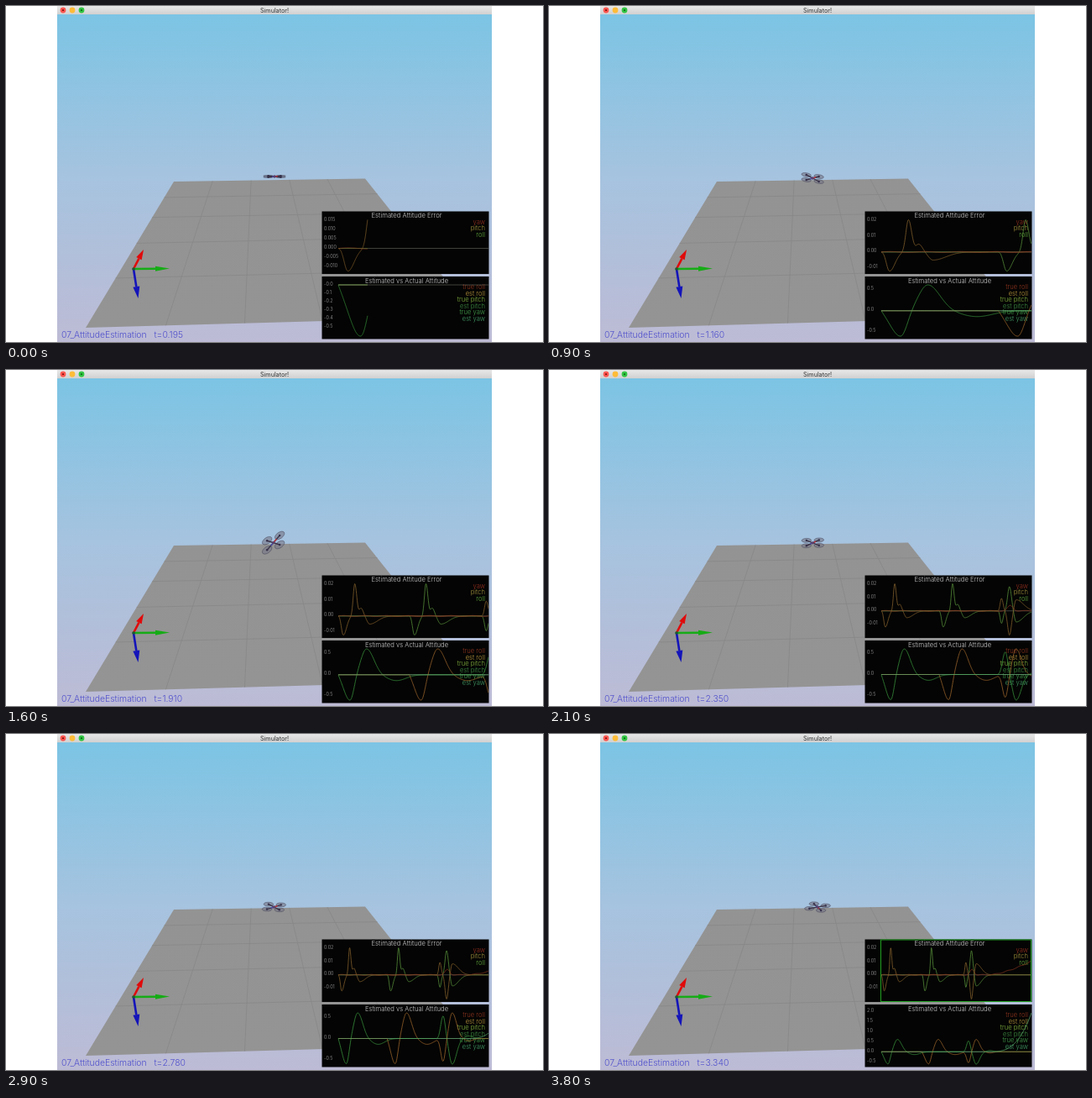
An HTML page with a canvas that plays this animation: 640x400 px, repeating every 3900 ms.

```html
<!DOCTYPE html>
<html lang="en">
<head>
<meta charset="utf-8">
<title>Simulator!</title>
<style>
  html, body { margin: 0; width: 100%; height: 100%; overflow: hidden; background: #fff; }
  canvas { display: block; width: 640px; height: 400px; }
</style>
</head>
<body>
<canvas id="stage" width="640" height="400"></canvas>
<script>
const ctx = document.getElementById("stage").getContext("2d");
const STEP = 100, STEPS = 39;

// Simulation clock: it slows down after the third manoeuvre begins
const CLOCK = [[0, .195], [19, 2.231], [21, 2.35], [29, 2.78], [34, 3.06], [38, 3.34]];

function simTime(n) {
  const i = Math.max(1, CLOCK.findIndex(([k]) => k >= n));
  const [n0, t0] = CLOCK[i - 1], [n1, t1] = CLOCK[i];
  return Math.round((t0 + (t1 - t0) * (n - n0) / (n1 - n0)) * 200) / 200;
}

// Bell with separate widths before and after its centre
const bell = (x, c, rise, fall = rise) => Math.exp(-(((x - c) / (x < c ? rise : fall)) ** 2));
// Zero before the manoeuvre begins, then quickly full
const onset = s => s > 0 ? 1 - Math.exp(-s / .02) : 0;

// Responses to one manoeuvre, s seconds after it begins
const swing = s => onset(s) * (.62 * bell(s, .36, .1, .13) - .615 * bell(s, .15, .11, .07) - .14 * bell(s, .74, .17));
const swingErr = s => onset(s) * (.0208 * bell(s, .21, .028, .035) - .0128 * bell(s, .062, .035, .06)
  + .005 * bell(s, .29, .03, .04) - .0052 * bell(s, .4, .05, .14));
const twist = s => onset(s) * (.62 * bell(s, .29, .08, .11) - .55 * bell(s, .12, .06) - .06 * bell(s, .6, .1));
const twistErr = s => onset(s) * (.0185 * bell(s, .185, .04, .045) - .01 * bell(s, .06, .03, .035)
  - .0085 * bell(s, .29, .04, .16));

// Pitch first, roll at T2, both opposed at T3, then a growing yaw
const T2 = .905, T3 = 1.82;
const ramp = t => Math.max(0, (t - 2.4) / .94);
const pitch = t => swing(t) - twist(t - T3);
const roll = t => swing(t - T2) + twist(t - T3);
const yaw = t => 1.95 * ramp(t) ** 3;
const pitchErr = t => swingErr(t) - twistErr(t - T3);
const rollErr = t => swingErr(t - T2) + twistErr(t - T3);
const yawErr = t => .0003 * Math.sin(t * 23) + .004 * bell(t, T3 + .2, .06) + .0105 * ramp(t) ** 1.5;

const droneX = t => 320 - 10 * bell(t, 1.38, .3, .35) - 5.7 * bell(t, 2.33, .25, .3);
const droneY = t => 206.2 - 3.2 * Math.exp(.195 - t);

// Drawing helpers
function text(str, x, y, size, color, align = "left", weight = 300) {
  ctx.font = `${weight} ${size}px Inter, "Open Sans", sans-serif`;
  ctx.textAlign = align;
  ctx.fillStyle = color;
  ctx.fillText(str, x, y);
}

function path(points) {
  ctx.beginPath();
  points.forEach(([x, y]) => ctx.lineTo(x, y));
}

function fill(points, color) {
  path(points);
  ctx.fillStyle = color;
  ctx.fill();
}

function stroke(points, color, width) {
  path(points);
  ctx.strokeStyle = color;
  ctx.lineWidth = width;
  ctx.stroke();
}

function dot(x, y, r, color) {
  ctx.beginPath();
  ctx.arc(x, y, r, 0, 7);
  ctx.fillStyle = color;
  ctx.fill();
}

function gradient(y0, y1, ...colors) {
  const g = ctx.createLinearGradient(0, y0, 0, y1);
  colors.forEach((c, i) => g.addColorStop(i / (colors.length - 1), c));
  return g;
}

// Maps the unit square onto a quad in perspective
function perspective([a, b, c, d]) {
  const sx = a[0] - b[0] + c[0] - d[0], sy = a[1] - b[1] + c[1] - d[1];
  const x1 = b[0] - c[0], x2 = d[0] - c[0], y1 = b[1] - c[1], y2 = d[1] - c[1];
  const det = x1 * y2 - x2 * y1;
  const g = (sx * y2 - x2 * sy) / det, h = (x1 * sy - sx * y1) / det;
  return (u, v) => [0, 1].map(k =>
    ((b[k] - a[k] + g * b[k]) * u + (d[k] - a[k] + h * d[k]) * v + a[k]) / (g * u + h * v + 1));
}

const GROUND = [[200, 209], [428, 205.5], [559, 370], [95, 383]];
const onGround = perspective(GROUND);

function drawScene() {
  ctx.fillStyle = "#fff";
  ctx.fillRect(0, 0, 640, 400);
  ctx.fillStyle = gradient(10, 400, "#7cc4e4", "#a6c3df", "#bdbbd5");
  ctx.fillRect(61, 10, 518, 390);
  fill(GROUND, gradient(205, 383, "#939393", "#949494"));
  for (let k = .2; k < .9; k += .2) {
    stroke([onGround(k, 0), onGround(k, 1)], "#868686", .7);
    stroke([onGround(0, k), onGround(1, k)], "#868686", .7);
  }
}

function drawTitleBar() {
  ctx.fillStyle = gradient(0, 10, "#e8e8e8", "#d0d0d0");
  ctx.fillRect(61, 0, 518, 10);
  ["#fc5650", "#fdbc38", "#34c544"].forEach((c, i) => dot(68 + i * 11, 5, 3.4, c));
  dot(68, 5, 1.1, "#7a0c08");
  dot(90, 5, 1.1, "#0c6a18");
  text("Simulator!", 320, 7.6, 7.2, "#333", "center", 400);
}

function arrow(x, y, head, width, color) {
  const ox = 152, oy = 313, n = Math.hypot(x - ox, y - oy);
  const ux = (x - ox) / n, uy = (y - oy) / n, bx = x - ux * head, by = y - uy * head;
  stroke([[ox, oy], [bx, by]], color, 2.6);
  fill([[x, y], [bx - uy * width, by + ux * width], [bx + uy * width, by - ux * width]], color);
}

function drawAxes() {
  arrow(164, 290, 12, 3.6, "#e00a0a");
  arrow(195, 312.6, 17, 3, "#16ac16");
  arrow(157.5, 348, 14, 4, "#1414ba");
  dot(152, 313, 1.8, "#1c5a30");
}

function drawDrone(t) {
  const tilt = 7.2 * roll(t), lean = 3 + 6 * pitch(t), turn = yaw(t);
  const c = Math.cos(turn), s = Math.sin(turn);
  // Body right and forward axes on screen
  const right = [7.5 * c, tilt + lean * s], fore = [7.5 * s, tilt * s - lean * c];
  const at = (u, v) => [right[0] * u + fore[0] * v, right[1] * u + fore[1] * v];
  const rotors = [at(-1, 1), at(1, 1), at(1, -1), at(-1, -1)];
  ctx.save();
  ctx.translate(droneX(t), droneY(t));
  for (const [x, y] of rotors) {
    ctx.save();
    ctx.transform(...right, ...fore, x, y);
    ctx.beginPath();
    ctx.arc(0, 0, .76, 0, 7);
    ctx.restore();
    ctx.fillStyle = "rgba(120,120,136,.62)";
    ctx.fill();
    ctx.strokeStyle = "rgba(70,70,90,.75)";
    ctx.lineWidth = .7;
    ctx.stroke();
  }
  stroke([rotors[0], rotors[2]], "#3c3448", 1.4);
  stroke([rotors[1], rotors[3]], "#3c3448", 1.4);
  stroke([[0, 0], at(.5, .5)], "#c23038", 1.4);
  stroke([[0, 0], at(-.4, -.4)], "#4a4ab0", 1.4);
  rotors.forEach(([x, y]) => dot(x, y, 1.2, "#35304a"));
  dot(0, 0, 1.7, "#58406c");
  ctx.restore();
}

// Plots
const LEFT = 396, WIDTH = 179, HEIGHT = 74.5, SAMPLES = 420;
const PLOTS = [
  { title: "Estimated Attitude Error", top: 244.5,
    lines: [[rollErr, "#58923a"], [pitchErr, "#86622c"], [yawErr, "#8c3820"]],
    legend: [["yaw", "#96301f"], ["pitch", "#a0903c"], ["roll", "#62ac3c"]] },
  { title: "Estimated vs Actual Attitude", top: 322,
    lines: [[pitch, "#3a963c"], [roll, "#a0682c"], [yaw, "#5cb070"]],
    legend: [["true roll", "#8e341e"], ["est roll", "#b8963c"], ["true pitch", "#80b03c"],
      ["est pitch", "#3c8c40"], ["true yaw", "#42a04c"], ["est yaw", "#429c66"]] }
];

function tickStep(range) {
  for (let p = .001; ; p *= 10) {
    for (const s of [p, p * 5]) if (range / s <= 6.5) return s;
  }
}

function drawPlot({ title, top, lines, legend }, t, passed) {
  const bottom = top + HEIGHT, high = top + 10, low = bottom - 3.5;
  ctx.fillStyle = "#040404";
  ctx.fillRect(376.5, top, 199, HEIGHT);

  const span = Math.max(1, t);
  const times = Array.from({ length: SAMPLES + 1 }, (_, i) => t * i / SAMPLES);
  const series = lines.map(([f]) => times.map(f));
  const min = Math.min(...series.flat()), max = Math.max(...series.flat());
  const px = x => LEFT + WIDTH * x / span;
  const py = v => low - (low - high) * (v - min) / (max - min);

  const step = tickStep(max - min), digits = Math.ceil(-Math.log10(step) - 1e-9);
  for (let k = -6; k <= 7; k++) {
    const y = py(k * step) - 1.5;
    if (y < top + 4 || y > bottom - 6) continue;
    const sign = k < 0 || (k === 0 && max < step) ? "-" : "";
    text(sign + Math.abs(k * step).toFixed(digits), 379, y + 2, 5.5, "#a4a4a4");
  }

  legend.forEach(([name, color], i) => text(name, 571, top + 15.3 + i * 7.5, 7.6, color, "right"));
  text(title, 477.5, top + 7.5, 7.7, "#cccccc", "center");

  ctx.save();
  ctx.beginPath();
  ctx.rect(LEFT - 1, top, WIDTH + 1, HEIGHT);
  ctx.clip();
  ctx.lineJoin = "round";
  stroke([[LEFT, py(0)], [LEFT + WIDTH, py(0)]], "#6c6c64", .6);
  series.forEach((vs, i) => stroke(vs.map((v, j) => [px(times[j]), py(v)]), lines[i][1], .75));
  ctx.restore();

  if (passed) {
    ctx.strokeStyle = "#20a020";
    ctx.lineWidth = 1;
    ctx.strokeRect(LEFT - .5, top + .5, WIDTH, HEIGHT - 1);
  }
}

function draw(n) {
  const t = simTime(n);
  drawScene();
  drawTitleBar();
  drawDrone(t);
  drawAxes();
  PLOTS.forEach((plot, i) => drawPlot(plot, t, i === 0 && t >= 3));
  text("07_AttitudeEstimation", 66, 395.3, 10.4, "#5050cc");
  text("t=" + t.toFixed(3), 176.5, 395.3, 10.4, "#5050cc");
}

let shown = -1;
const start = performance.now();
function tick(now) {
  const n = Math.floor(Math.max(0, now - start) / STEP) % STEPS;
  if (n !== shown) draw(shown = n);
  requestAnimationFrame(tick);
}
draw(shown = 0);
requestAnimationFrame(tick);
</script>
</body>
</html>
```
